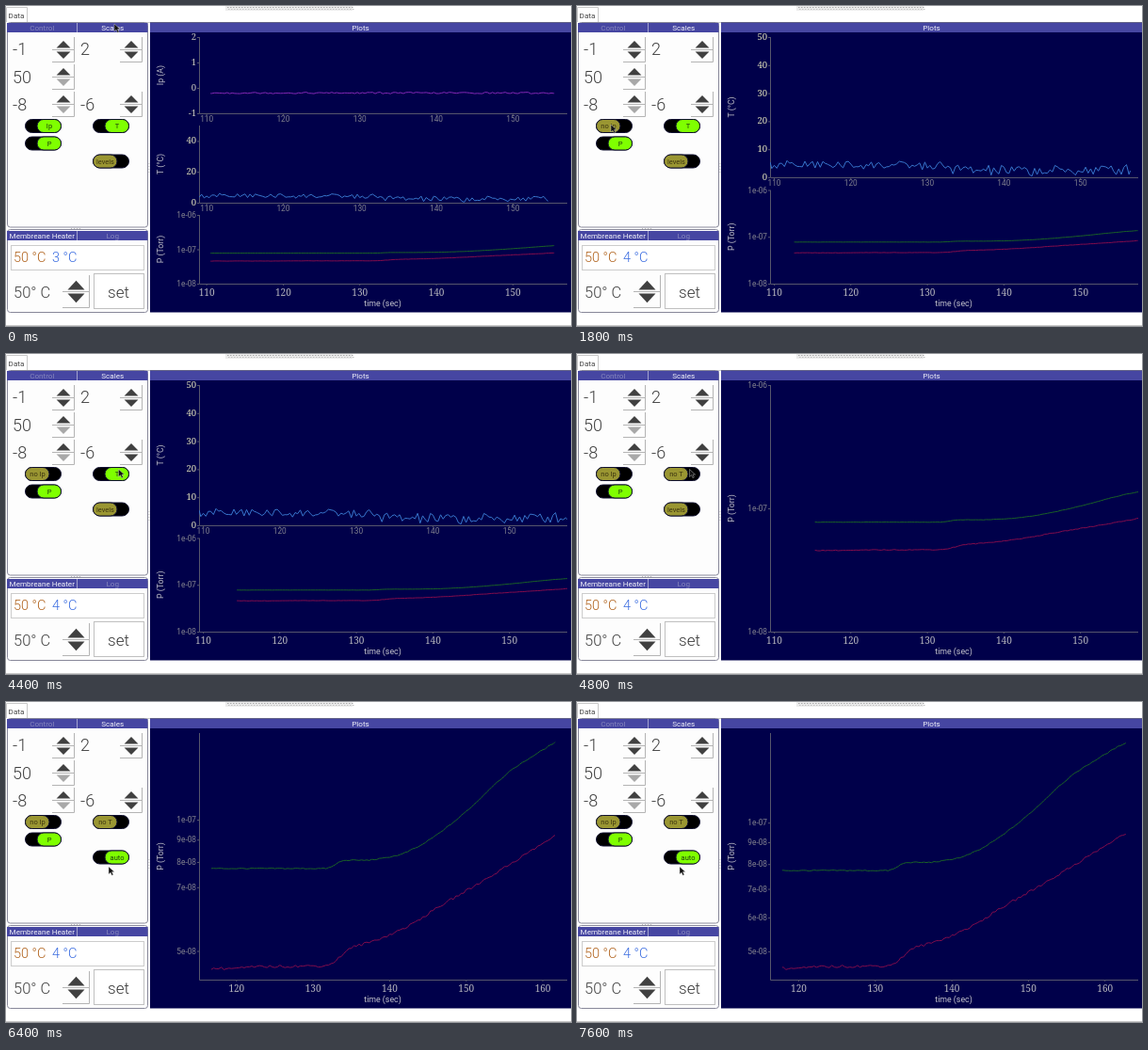
Recreate the animation shown at these times as an HTML page. Size 600 by 340 pixels, loop 8000 ms.

```html
<!DOCTYPE html>
<html lang="en">
<head>
<meta charset="utf-8">
<title>Plots</title>
<style>
  html, body { margin: 0; width: 100%; height: 100%; overflow: hidden; background: #fff; }
  svg { display: block; width: 600px; height: 340px; font-family: Roboto, sans-serif; }
  text { white-space: pre; }
  .serif { font-family: "Noto Serif", serif; }
  .light { font-weight: 300; }
  polyline { fill: none; stroke-width: 1; }
</style>
</head>
<body>
<svg id="stage" viewBox="0 0 600 340"></svg>
<script>
const LOOP = 8000;
const SPAN = 44.9;          // seconds of data kept in view
const PX_PER_SEC = 8.13;
const LEFT = 205, RIGHT = 596;

// Each row: time in ms, followed by the values that change at that moment.
const STEPS = [
  [0,    { start: 110.5, temp: 3, cursor: [115, 19], ip: 1, t: 1, auto: 0, tEnd: 154.6 }],
  [200,  { start: 110.6, cursor: [88, 58] }],
  [400,  { start: 110.75, cursor: [36, 126], tEnd: 155.2 }],
  [600,  { start: 110.95, ip: 0, tEnd: 155.8 }],
  [1000, { start: 111.3 }],
  [1200, { start: 111.6, tEnd: 156.1 }],
  [1400, { start: 112.1, temp: 4, tEnd: 156.5 }],
  [1800, { start: 112.6 }],
  [2200, { start: 112.8, tEnd: 156.8 }],
  [2400, { start: 113 }],
  [2800, { start: 113.3, temp: 3, tEnd: 158 }],
  [3200, { start: 114 }],
  [3600, { start: 114.4 }],
  [4000, { cursor: [80, 126], temp: 4 }],
  [4200, { cursor: [119.5, 122.5] }],
  [4800, { start: 115.3, t: 0 }],
  [5200, { start: 116 }],
  [5600, { cursor: [114, 165] }],
  [6000, { start: 116.35, auto: 1 }],
  [6200, { start: 116.5, cursor: [109, 175] }],
  [6400, { start: 116.7 }],
  [7000, { start: 117.2, six: 1 }],
  [7200, { start: 117.4 }],
  [7400, { start: 117.65 }],
  [7600, { start: 117.85 }],
];

// Pressures as log10 over time.
const GREEN = [[100, -7.112], [131.7, -7.112], [132.5, -7.108], [133.5, -7.096], [134.3, -7.093],
  [137.2, -7.093], [139, -7.089], [141.5, -7.08], [144, -7.06], [146.4, -7.032], [148.9, -6.998],
  [151.4, -6.959], [153.8, -6.917], [156.3, -6.881], [158.8, -6.853], [161.6, -6.823], [163, -6.81]];
const RED = [[100, -7.342], [120, -7.341], [123.1, -7.337], [131.7, -7.335], [132.9, -7.325],
  [133.9, -7.308], [135, -7.293], [137.2, -7.282], [139.9, -7.265], [142.8, -7.241], [146.4, -7.2],
  [150.1, -7.162], [153.8, -7.123], [157.5, -7.082], [161.6, -7.037], [163, -7.024]];
const TEMP = [[100, 4.7], [125, 4.3], [131, 4], [135, 2.5], [145, 2.2], [160, 3]];

function lookup(points, x) {
  const i = Math.max(1, points.findIndex(p => p[0] >= x));
  const [x0, y0] = points[i - 1], [x1, y1] = points[i];
  return y0 + (y1 - y0) * (x - x0) / (x1 - x0);
}

function noise(n, seed) {
  const s = Math.sin(n * 12.9898 + seed * 78.233) * 43758.5453;
  return (s - Math.floor(s)) * 2 - 1;
}

const green = s => lookup(GREEN, s) + 0.0012 * noise(Math.round(s * 3), 1);
const red = s => lookup(RED, s) + 0.003 * noise(Math.round(s * 3), 2);
const temp = s => Math.max(0.3, lookup(TEMP, s) + (s < 131 ? 1.5 : 2) * noise(Math.round(s * 3), 3));
const current = s => -0.2 + 0.03 * noise(Math.round(s * 3), 4);

// Drawing helpers
const text = (x, y, str, size, fill, anchor = 'middle', cls = '', extra = '') =>
  `<text x="${x}" y="${y}" font-size="${size}" fill="${fill}" text-anchor="${anchor}" class="${cls}" ${extra}>${str}</text>`;
const rect = (x, y, w, h, fill, stroke = 'none', r = 0) =>
  `<rect x="${x}" y="${y}" width="${w}" height="${h}" rx="${r}" fill="${fill}" stroke="${stroke}"/>`;
const path = (d, fill, stroke = 'none') => `<path d="${d}" fill="${fill}" stroke="${stroke}"/>`;

// Two stacked buttons, each with a shaded right and lower edge.
function spinner(x, y, w, h, downOff) {
  const cx = x + w / 2, mid = Math.round(y + h / 2) - 0.5, a = w * 0.31, b = h * 0.28;
  return path(`M${x} ${mid}h${w}M${x} ${y + h - 0.5}h${w - 0.5}V${y}`, 'none', '#b4b4b4') +
    path(`M${cx - a} ${mid - 2}h${2 * a}l${-a} ${-b}z`, '#404040') +
    path(`M${cx - a} ${mid + 2}h${2 * a}l${-a} ${b}z`, downOff ? '#a8a8a8' : '#404040');
}

function toggle(x, y, on, label) {
  return rect(x + 0.5, y + 0.5, 38, 14, '#000', '#101030', 7) +
    rect(on ? x + 13 : x + 0.5, y + 0.5, 25.5, 14, on ? '#7fff00' : '#9a9632', '#101030', 7) +
    text(on ? x + 26 : x + 13.5, y + 10.2, label, 7.5, on ? '#1c3c10' : '#3c3410');
}

function header(x, y, w, label, active = true) {
  return rect(x, y, w, 10, '#4646a2') + text(x + w / 2, y + 8.2, label, 8.1, active ? '#f0f0f8' : '#8484bc');
}

function controls() {
  const value = (x, y, str, size = 18) => text(x, y, str, size, '#404040', 'start', 'light');
  let dots = '';
  for (let x = 235; x < 368; x += 3) dots += rect(x, 1, 1.5, 1, '#aaa') + rect(x + 1, 3, 1.5, 1, '#c4c4c4');
  return rect(0, 0, 600, 340, '#fff') +
    path('M22.5 17.5H600M0 339.5H600', 'none', '#c8c8c8') +
    path('M.5 17V1.5H22.5V17.5', '#fff', '#c8c8c8') + text(11, 12.5, 'Data', 8.1, '#444') +
    rect(233, 0, 135, 5, '#ececec') + dots +
    rect(1.5, 17.5, 149, 217.5, '#fdfdfd', '#88889a', 3) +
    header(1, 18, 74.5, 'Control', false) + header(76, 18, 74.5, 'Scales') +
    value(7, 52, '-1') + spinner(49, 33, 24, 27) +
    value(79, 52, '2') + spinner(121, 33, 24, 27) +
    value(7, 81.5, '50') + spinner(49, 62, 24, 27, true) +
    value(7, 110.5, '-8') + spinner(49, 91, 24, 27, true) +
    value(79, 110.5, '-6') + spinner(121, 91, 24, 27) +
    rect(1.5, 237.5, 149, 88, '#fdfdfd', '#88889a', 3) +
    header(1, 239, 74.5, 'Membreane Heater') + header(76, 239, 74.5, 'Log', false) +
    rect(5.5, 254.5, 141, 26, '#fff', '#ccc') +
    text(8, 271.7, '50 °C', 14.5, '#b0621c', 'start', 'light') +
    value(8, 310, '50° C', 16.5) + spinner(60, 286, 29, 35) +
    rect(93.5, 284.5, 53, 37, '#fff', '#c0c0c0') + text(119.5, 310, 'set', 17, '#333', 'middle', 'light') +
    [69, 72, 75, 78].map(x => rect(x, 236, 1, 1, '#bbb')).join('') +
    [167, 170, 173, 176].map(y => rect(151.5, y, 1, 1, '#bbb')).join('') +
    rect(153, 17.5, 447, 308, '#00004a') + header(153, 18, 447, 'Plots');
}
const CONTROLS = controls();

function curve(fn, from, to, xOf, yOf, color, step = 1 / 3) {
  let pts = '';
  const add = s => { pts += `${xOf(s).toFixed(1)},${yOf(fn(s)).toFixed(1)} `; };
  add(from);
  for (let i = Math.floor(from / step) + 1; i * step < to; i++) add(i * step);
  add(to);
  return `<polyline points="${pts}" stroke="${color}" clip-path="url(#plot)"/>`;
}

const AXIS = '#56566c';

function frame(top, bottom, label, ticks, style, xOf, last) {
  let out = path(`M205.5 ${top}V${bottom + 0.5}H${RIGHT}`, 'none', AXIS);
  for (const [y, str] of ticks) {
    out += path(`M203 ${y + 0.5}h2`, 'none', AXIS) +
      text(202, y + 3, str, style.size, style.fill, 'end', style.cls);
  }
  for (let s = 110; s <= 160; s += 10) {
    const x = xOf(s);
    if (x < LEFT || x > RIGHT) continue;
    out += path(`M${x} ${bottom}v2`, 'none', AXIS) +
      (last ? text(x, bottom + 12.5, s, 10, '#b4b4bc', 'middle', 'serif')
            : text(x, bottom + 8.5, s, 8.3, '#80808e'));
  }
  const cy = (top + bottom) / 2;
  return out + text(0, 0, label, 8.8, '#bcbcc6', 'middle', '', `transform="translate(167 ${cy}) rotate(-90)"`);
}

const SERIF = { size: 9.5, fill: '#c8c8bc', cls: 'serif' };
const SMALL = { size: 8.3, fill: '#84848e', cls: '' };

function plots(s) {
  const origin = s.auto ? s.start - 1.6 : Math.min(s.start, 110.95) - 1.5;
  const xOf = sec => LEFT + (sec - origin) * PX_PER_SEC;
  const end = s.start + SPAN;
  const linear = (lo, hi, top, bottom) => v => bottom - (v - lo) / (hi - lo) * (bottom - top);
  let out = '';
  if (s.ip) {
    const y = linear(-1, 2, 33, 114);
    out += frame(33, 114, 'Ip (A)', [2, 1, 0, -1].map(v => [y(v), v]), SERIF, xOf) +
      curve(current, s.start, end, xOf, y, '#8428b4');
  }
  if (s.t) {
    const top = s.ip ? 127 : 33, bottom = s.ip ? 209 : 182;
    const y = linear(0, 50, top, bottom);
    const marks = s.ip ? [0, 20, 40] : [0, 10, 20, 30, 40, 50];
    out += frame(top, bottom, 'T (°C)', marks.map(v => [y(v), v]), { ...SERIF, fill: '#e4e4bc' }, xOf) +
      curve(temp, origin, s.tEnd, xOf, y, '#3876cc');
  }
  const top = s.ip ? 222 : s.t ? 195.5 : 33;
  let y = linear(-8, -6, top, 295);
  let marks = [-6, -7, -8].map(v => [y(v), `1e-0${-v}`]);
  if (s.auto) {
    const low = -7.342, high = lookup(GREEN, end);
    y = linear(low, high, 43, 283.5);
    marks = [10, 9, 8, 7, 6, 5].filter(n => n !== 6 || s.six)
      .map(n => [y(Math.log10(n) - 8), n === 10 ? '1e-07' : `${n}e-08`]);
  }
  return out + frame(s.auto ? 33 : top, 295, 'P (Torr)', marks, SMALL, xOf, true) +
    curve(green, s.start, end, xOf, y, '#1a6026') +
    curve(red, s.start, end, xOf, y, '#820c4a') +
    text(400, 319, 'time (sec)', 8.8, '#c4c4cc');
}

function cursor([x, y]) {
  return `<path transform="translate(${x} ${y})" d="M0 0v8l2-1.8 1.4 3 1.5-.7-1.4-2.9h2.6z" fill="#111" stroke="#ddd" stroke-width=".4"/>`;
}

function scene(s) {
  return '<clipPath id="plot"><rect x="205" y="28" width="391" height="270"/></clipPath>' +
    CONTROLS +
    toggle(20, 120, s.ip, s.ip ? 'Ip' : 'no Ip') +
    toggle(92, 120, s.t, s.t ? 'T' : 'no T') +
    toggle(20, 138.5, true, 'P') +
    toggle(92, 157.5, s.auto, s.auto ? 'auto' : 'levels') +
    text(49, 271.7, `${s.temp} °C`, 14.5, '#3a6ce0', 'start', 'light') +
    plots(s) + cursor(s.cursor);
}

const stage = document.getElementById('stage');
const began = performance.now();
let shown = -1;

function tick() {
  const time = (performance.now() - began) % LOOP;
  const count = STEPS.filter(([at]) => at <= time).length;
  if (count !== shown) {
    shown = count;
    stage.innerHTML = scene(Object.assign({}, ...STEPS.slice(0, count).map(step => step[1])));
  }
  requestAnimationFrame(tick);
}
tick();
</script>
</body>
</html>
```
